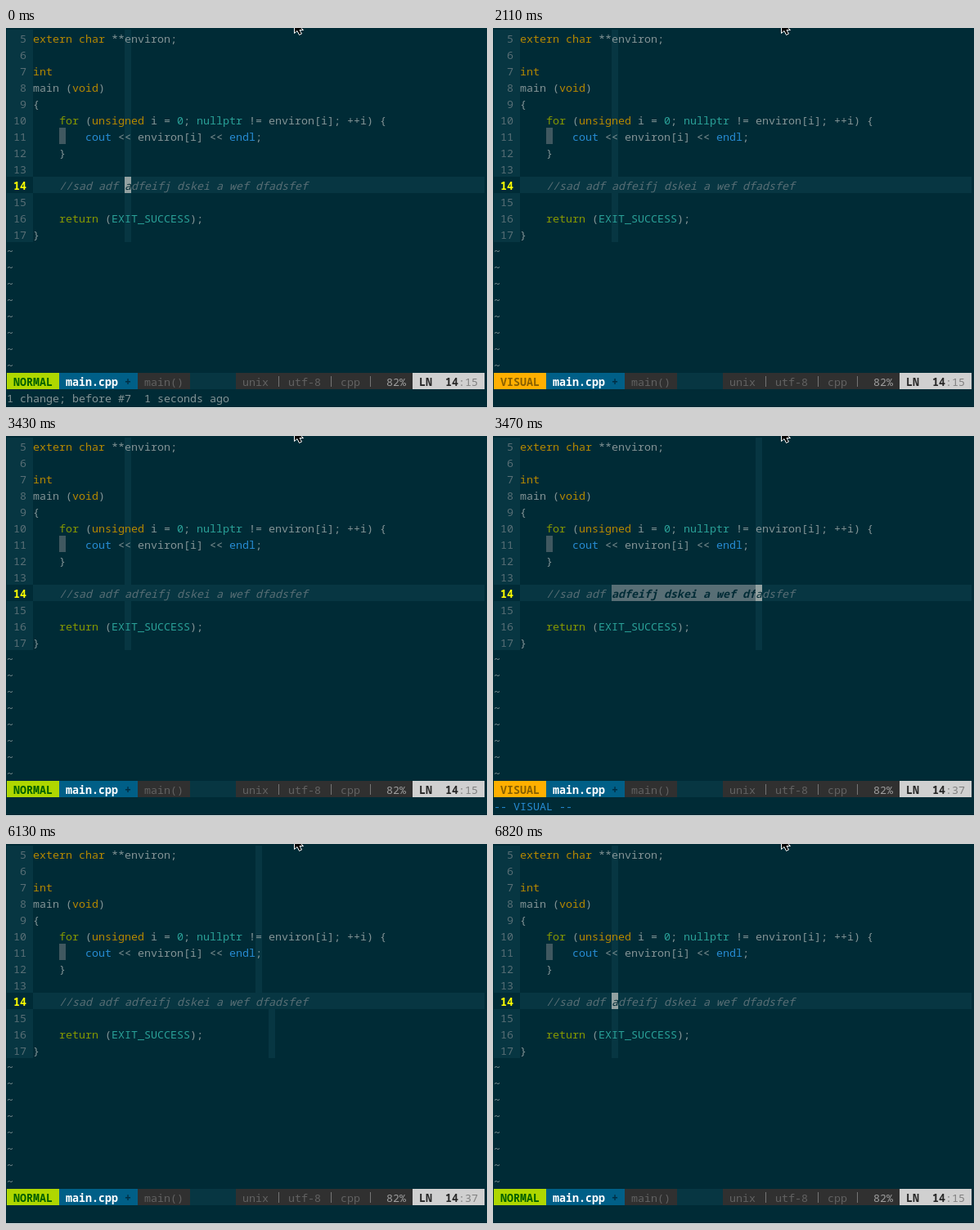
An HTML page that plays this animation: 588 px wide and 465 px high, repeating every 8 s.

```html
<!DOCTYPE html>
<html lang="en">
<head>
<meta charset="utf-8">
<title>Editor session</title>
<style>
  html, body { margin: 0; width: 100%; height: 100%; overflow: hidden; background: #002b36; }
  #stage {
    position: relative; width: 588px; height: 465px; overflow: hidden;
    background: #002b36; color: #839496;
    font: 13.3333px/22px "Noto Sans Mono", "DejaVu Sans Mono", monospace;
    font-variant-ligatures: none;
  }
  #stage span, #stage b { position: absolute; height: 20px; white-space: pre; font-weight: 400; }
  #stage b { background: #073642; }
  #edge { position: absolute; left: 0; right: 0; bottom: 0; height: 1px; background: #dfe6e6; }
  #mouse { position: absolute; left: 348px; top: 0; }
  .y { color: #b58900 } .g { color: #859900 } .c { color: #2aa198 } .u { color: #268bd2 }
  .num, .note { color: #586e75 }
  .note, .vis, .cur, .shade, .hint { font-style: italic }
  #stage .now { color: #ffff00; font-weight: 700 }
  #stage .vis { background: #586e75; color: #002b36; font-weight: 700 }
  .tab { background: #405860 }
  .cur { background: #93a1a1; color: #002b36 }
  .wait { background: #839496 }
  .shade { color: #777 }
  .plain { font-style: normal }
  .flat { background: #002b36 }
  #stage .hint { color: #d78700; background: #002b36; font-weight: 700 }
  #stage .NORMAL { background: #afd700; color: #005f00; font-weight: 700 }
  #stage .VISUAL { background: #ffaf00; color: #875f00; font-weight: 700 }
  #stage .file { background: #005f87; color: #fff; font-weight: 700 }
  #stage .plus { color: #002f45; font-weight: 700 }
  .info { background: #303030; color: #626262 }
  .pct { color: #9e9e9e }
  #stage .pos { background: #d0d0d0; color: #262626; font-weight: 700 }
  .dim { color: #808080 }
  #stage .bar { width: 1px; height: 13px; margin: 4px; background: #757575 }
</style>
</head>
<body>
<div id="stage">
  <div id="screen"></div>
  <svg id="mouse" width="20" height="12">
    <path d="M4.500-8V6.500L8 3.500l2.500 5 3-1.500-2.500-4.500h4.500Z" fill="#000" stroke="#fff"/>
  </svg>
  <div id="edge"></div>
</div>
<script>
const LOOP = 8000, ROW = 9, NOTE_COL = 8;
const NOTE = '//sad adf adfeifj dskei a wef dfadsfef';

// Source lines from number 5 on; {x:text} sets a colour class.
const CODE = [
  '{y:extern} {y:char} **environ;',
  '',
  '{y:int}',
  'main ({y:void})',
  '{',
  '    {g:for} ({y:unsigned} i = {c:0}; {c:nullptr} != environ[i]; ++i) {',
  '        {u:cout} << environ[i] << {u:endl};',
  '    }',
  '',
  '',
  '',
  '    {g:return} ({c:EXIT_SUCCESS});',
  '}'
];

// Each step changes part of the state. top/low: cursor column above/below the cursor line.
const hop = (t, col) => [t, { cur: null, top: col }];
const land = (t, col) => [t, { cur: col, top: col, low: col }];
const STEPS = [
  [0, { cur: 18, top: 18, low: 18, mode: 'NORMAL', at: 15, sel: null, hints: false,
        prompt: '', msg: '1 change; before #7  1 seconds ago', tone: '' }],
  [1260, { cur: null, sel: [18, 19] }],
  [1300, { cur: 18, sel: null, mode: 'VISUAL', msg: '-- VISUAL --', tone: 'u' }],
  [2110, { cur: null, msg: '' }],
  [2150, { prompt: 'Search for character: ' }],
  [2360, { prompt: '', mode: 'NORMAL' }],
  [2400, { prompt: 'Target key: ', hints: true }],
  [3430, { prompt: '', hints: false }],
  [3470, { cur: 40, top: 40, low: 40, sel: [18, 40], mode: 'VISUAL', msg: '-- VISUAL --' }],
  [5090, { cur: null, sel: null, msg: '' }],
  [5140, { cur: 40, mode: 'NORMAL' }],
  hop(6130, 38), land(6170, 38),
  hop(6320, 34), land(6360, 34),
  hop(6480, 32), land(6520, 32),
  hop(6640, 26), land(6680, 26),
  land(6820, 18)
];

const states = [];
STEPS.reduce((prev, [t, change]) => {
  const s = { ...prev, ...change, t };
  if (s.cur !== null) s.at = s.cur - 3;
  states.push(s);
  return s;
}, {});

const esc = s => s.replace(/&/g, '&amp;').replace(/</g, '&lt;');
const place = (row, col) => `left:${1 + col * 8}px;top:${2 + row * 20}px`;
const put = (row, col, text, cls = '') =>
  `<span class="${cls}" style="${place(row, col)}">${esc(text)}</span>`;
const box = (row, col, w, h) =>
  `<b style="${place(row, col)};width:${w * 8}px;height:${h * 20}px"></b>`;
const note = (from, to, cls) => put(ROW, from, NOTE.slice(from - NOTE_COL, to - NOTE_COL), cls);

function codeLine(row, shaded) {
  let col = 4;
  return CODE[row].split(/(\{\w:[^}]*\})/).map(part => {
    const m = part.match(/^\{(\w):(.*)\}$/);
    const text = m ? m[2] : part;
    const out = put(row, col, text, shaded ? 'shade plain' : m ? m[1] : '');
    col += text.length;
    return out;
  }).join('');
}

function statusLine(s) {
  const r = 21;
  return box(r, 0, 73, 1) +
    put(r, 0, ` ${s.mode} `, s.mode) +
    put(r, 8, ' main.cpp   ', 'file') + put(r, 18, '+', 'plus') +
    put(r, 20, ' main() ', 'info') +
    put(r, 35, ' '.repeat(27), 'info') +
    [[36, 'unix'], [43, 'utf-8'], [51, 'cpp']].map(([c, t]) => put(r, c, t, 'info')).join('') +
    [41, 49, 55].map(c => `<b class="bar" style="${place(r, c)}"></b>`).join('') +
    put(r, 58, '82%', 'pct') +
    put(r, 62, ' LN  14    ', 'pos') + put(r, 69, ':' + s.at, 'dim');
}

function draw(s) {
  let out = box(0, 0, 4, ROW) + box(ROW + 1, 0, 4, 3) +
    box(0, s.top, 1, ROW) + box(ROW + 1, s.low, 1, 3) + box(ROW, 4, 69, 1);
  out += put(6, 8, ' ', 'tab');
  CODE.forEach((_, i) => {
    out += put(i, 1, String(i + 5).padStart(2), i === ROW ? 'now' : 'num');
    out += codeLine(i, s.hints && i > ROW);
  });
  const end = NOTE_COL + NOTE.length;
  out += note(NOTE_COL, end, 'note');
  if (s.hints) {
    out += note(18, end, 'shade flat') + put(ROW, 32, 'a', 'hint') + put(ROW, 40, 'b', 'hint');
  }
  if (s.sel) out += note(...s.sel, 'vis');
  if (s.cur !== null) out += note(s.cur, s.cur + 1, 'cur');
  for (let r = 13; r < 21; r++) out += put(r, 0, '~');
  out += statusLine(s);
  if (s.prompt) out += put(22, 0, s.prompt, 'c') + put(22, s.prompt.length, ' ', 'wait');
  else out += put(22, 0, s.msg, s.tone);
  document.getElementById('screen').innerHTML = out;
}

let shown = null;
const start = performance.now();
function tick() {
  const t = (performance.now() - start) % LOOP;
  const s = states.findLast(x => x.t <= t);
  if (s !== shown) draw(shown = s);
  requestAnimationFrame(tick);
}
tick();
</script>
</body>
</html>
```
